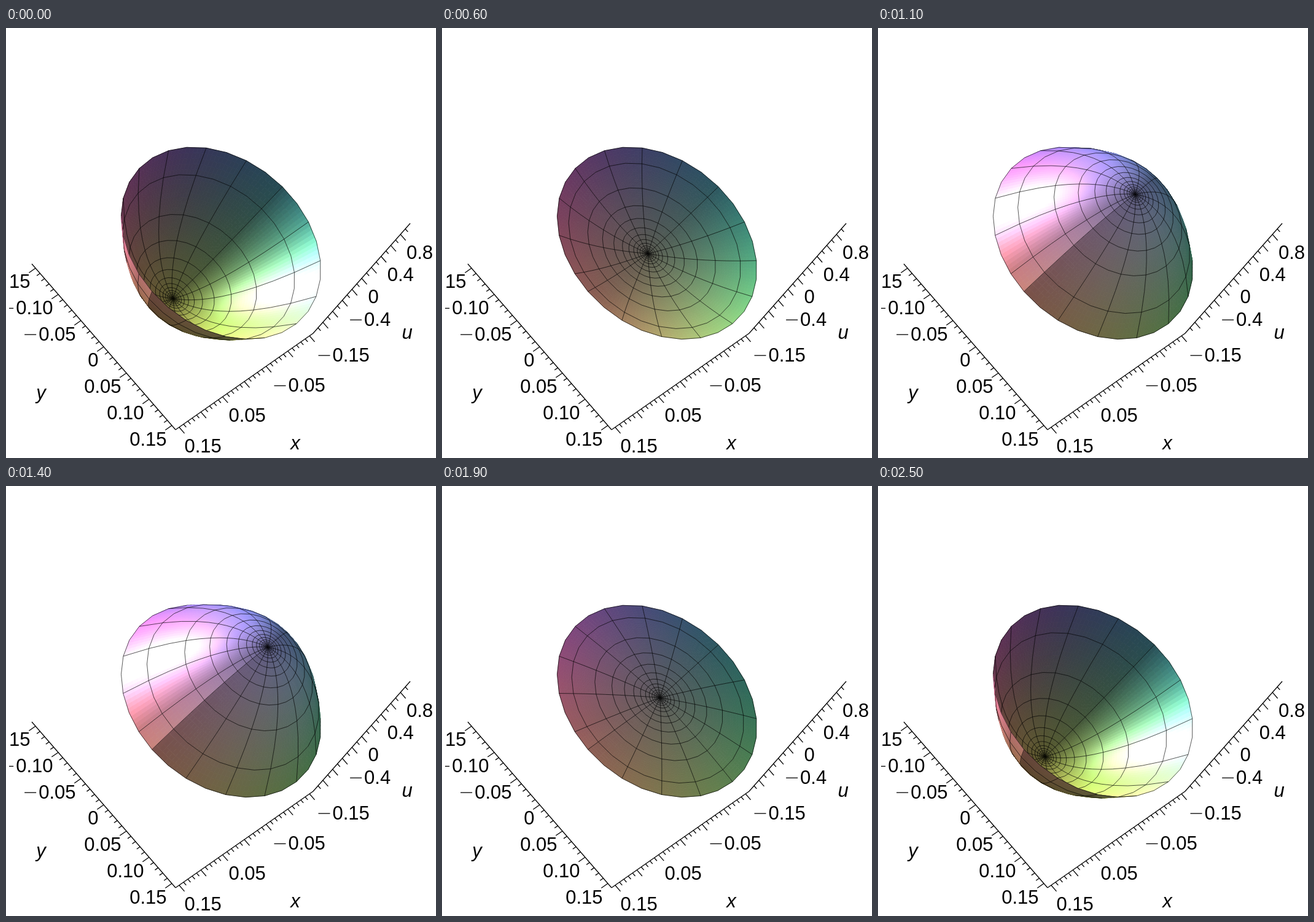
Write an HTML page with a canvas that moves like this. It is 700x700 px and loops after 2600 ms.

```html
<!DOCTYPE html>
<html>
<head>
<meta charset="utf-8">
<style>
  html, body { margin: 0; width: 100%; height: 100%; overflow: hidden; background: #fff; }
  canvas { display: block; }
</style>
</head>
<body>
<canvas id="stage" width="700" height="700"></canvas>
<script>
const ctx = document.getElementById('stage').getContext('2d');
const FRAME = 100, FRAMES = 26, STEP = 2 * Math.PI / 25;
const N = 31;                              // mesh cells in each direction
const FONT = '"Liberation Sans", Arial, sans-serif';

const dot = (a, b) => a[0] * b[0] + a[1] * b[1] + a[2] * b[2];
const unit = a => { const l = Math.hypot(...a); return a.map(v => v / l); };
const mix = (a, b, t) => a + (b - a) * t;

const OUT = unit([0.655, 0.123, 0.75]);    // towards the viewer
const LIGHT = unit([0.12, -0.99, 0]);
const HALF = unit(LIGHT.map((v, k) => v + OUT[k]));

const project = ([x, y, z]) => [
  350 - 112.4 * x + 117.4 * y + 78.6 * z,
  350.3 + 78.6 * x + 135.2 * y - 90.8 * z
];

// Radii grow geometrically from the centre to the rim.
const radius = j => j ? Math.pow(0.01, 1 - j / N) : 0;

function node(i, j, amp) {
  const a = 2 * Math.PI * i / N, r = radius(j);
  return project([r * Math.cos(a), r * Math.sin(a), amp * (1 - r * r)]);
}

function shade(i, r, amp, front) {
  const a = 2 * Math.PI * i / N;
  const x = r * Math.cos(a), y = r * Math.sin(a), z = amp * (1 - r * r);
  // Normals are one-sided along the seam.
  const b = a - 0.2 * Math.max(0, i - N + 1) + 0.1 * Math.max(0, 1 - i);
  let n = unit([2 * amp * r * Math.cos(b), 2 * amp * r * Math.sin(b), 1]);
  if (!front) n = n.map(v => -v);
  const lit = Math.max(0, dot(n, LIGHT));
  const power = 0.74 + 0.26 * Math.max(0, n[2]) + 1.95 * lit;
  const gloss = Math.min(1, lit * 8) * 130 * Math.pow(Math.max(0, dot(n, HALF)), 20);
  const rgb = [92 + 48 * x, 92 + 36 * y, 90 - 6 * x - 12 * y + 42 * z]
    .map(v => Math.min(255, Math.round(v * power + gloss)));
  return `rgb(${rgb})`;
}

function fillCell({ i, j, p, front }, amp) {
  const parts = j > 22 ? 5 : j > 14 ? 3 : 1;
  const at = (s, t) => [0, 1].map(k =>
    mix(mix(p[0][k], p[1][k], s), mix(p[3][k], p[2][k], s), t));
  for (let s = 0; s < parts; s++) for (let t = 0; t < parts; t++) {
    const r = mix(radius(j), radius(j + 1), (t + 0.5) / parts);
    ctx.fillStyle = ctx.strokeStyle = shade(i + (s + 0.5) / parts, r, amp, front);
    ctx.beginPath();
    for (const [u, v] of [[0, 0], [1, 0], [1, 1], [0, 1]])
      ctx.lineTo(...at((s + u) / parts, (t + v) / parts));
    ctx.closePath();
    ctx.fill();
    ctx.stroke();
  }
}

function drawMembrane(amp) {
  const layers = [[], []];                 // inside first, outside on top
  for (let i = 0; i < N; i++) for (let j = 0; j < N; j++) {
    const p = [node(i, j, amp), node(i + 1, j, amp), node(i + 1, j + 1, amp), node(i, j + 1, amp)];
    const area = (p[2][0] - p[0][0]) * (p[3][1] - p[1][1]) - (p[2][1] - p[0][1]) * (p[3][0] - p[1][0]);
    const front = area > 0;                // upper face towards the viewer
    const inside = front === (amp < 0);
    layers[inside ? 0 : 1].push({ i, j, p, front });
  }
  for (const cells of layers) {
    ctx.lineWidth = 0.8;
    for (const cell of cells) fillCell(cell, amp);
    ctx.lineWidth = 1;
    ctx.strokeStyle = 'rgba(0,0,0,0.65)';
    ctx.beginPath();
    for (const { i, j, p } of cells) {
      if (i % 2 === 0) { ctx.moveTo(...p[0]); ctx.lineTo(...p[3]); }
      if (j % 2 || j === N - 1) { ctx.moveTo(...p[3]); ctx.lineTo(...p[2]); }
    }
    ctx.stroke();
  }
}

function line(x1, y1, x2, y2) {
  ctx.beginPath();
  ctx.moveTo(x1, y1);
  ctx.lineTo(x2, y2);
  ctx.stroke();
}

function label(text, x, y, right) {
  const minus = text[0] === '-', digits = minus ? text.slice(1) : text;
  const left = right ? x - ctx.measureText(digits).width : x + (minus ? 25 : 0);
  ctx.fillText(digits, left, y + 11);
  if (minus) line(left - 23, y + 1.5, left - 4, y + 1.5);
}

// Evenly spaced ticks from a to b; every `every`-th one is long.
function ticks(a, b, count, every, dir, first = 0) {
  for (let k = 0; k <= count; k++) {
    const x = mix(a[0], b[0], k / count), y = mix(a[1], b[1], k / count);
    const len = (k + first) % every ? 6.5 : 13;
    line(x, y, x + dir[0] * len, y + dir[1] * len);
  }
}

function drawAxes() {
  ctx.save();
  ctx.beginPath();
  ctx.rect(5, 0, 695, 700);
  ctx.clip();
  ctx.fillStyle = ctx.strokeStyle = '#000';
  ctx.lineWidth = 1.3;
  line(42, 384, 276, 654);
  line(276, 654, 500, 497);
  line(500, 497, 658, 318);
  const down = [0.655, 0.756];
  ticks([48, 391], [270, 647], 30, 5, [-0.82, 0.57]);
  ticks([282, 650], [494, 501], 30, 5, down);
  ticks([508, 488], [650, 327], 18, 2, down, 1);

  ctx.font = '31px ' + FONT;
  ['-0.15', '-0.10', '-0.05', '0', '0.05', '0.10', '0.15'].forEach((s, k) =>
    label(s, 39.5 + 37 * k, 412 + 42.8 * k, true));
  ['0.15', '0.05', '-0.05', '-0.15'].forEach((s, k) =>
    label(s, 290.5 + 72 * k, 679.5 - 49.3 * k));
  ['0.8', '0.4', '0', '-0.4'].forEach((s, k) =>
    label(s, 652 - 31.3 * k, 364.5 + 36.4 * k));
  ctx.font = 'italic 31px ' + FONT;
  ctx.textAlign = 'center';
  ctx.fillText('y', 57, 604);
  ctx.fillText('x', 471, 686);
  ctx.fillText('u', 653, 506);
  ctx.restore();
}

let shown = -1;
function tick(now) {
  const k = Math.floor(now / FRAME) % FRAMES;
  if (k !== shown) {
    shown = k;
    ctx.fillStyle = '#fff';
    ctx.fillRect(0, 0, 700, 700);
    ctx.lineJoin = 'round';
    drawMembrane(-Math.cos(STEP * (k - 0.5)));
    drawAxes();
  }
  requestAnimationFrame(tick);
}
tick(0);
</script>
</body>
</html>
```
